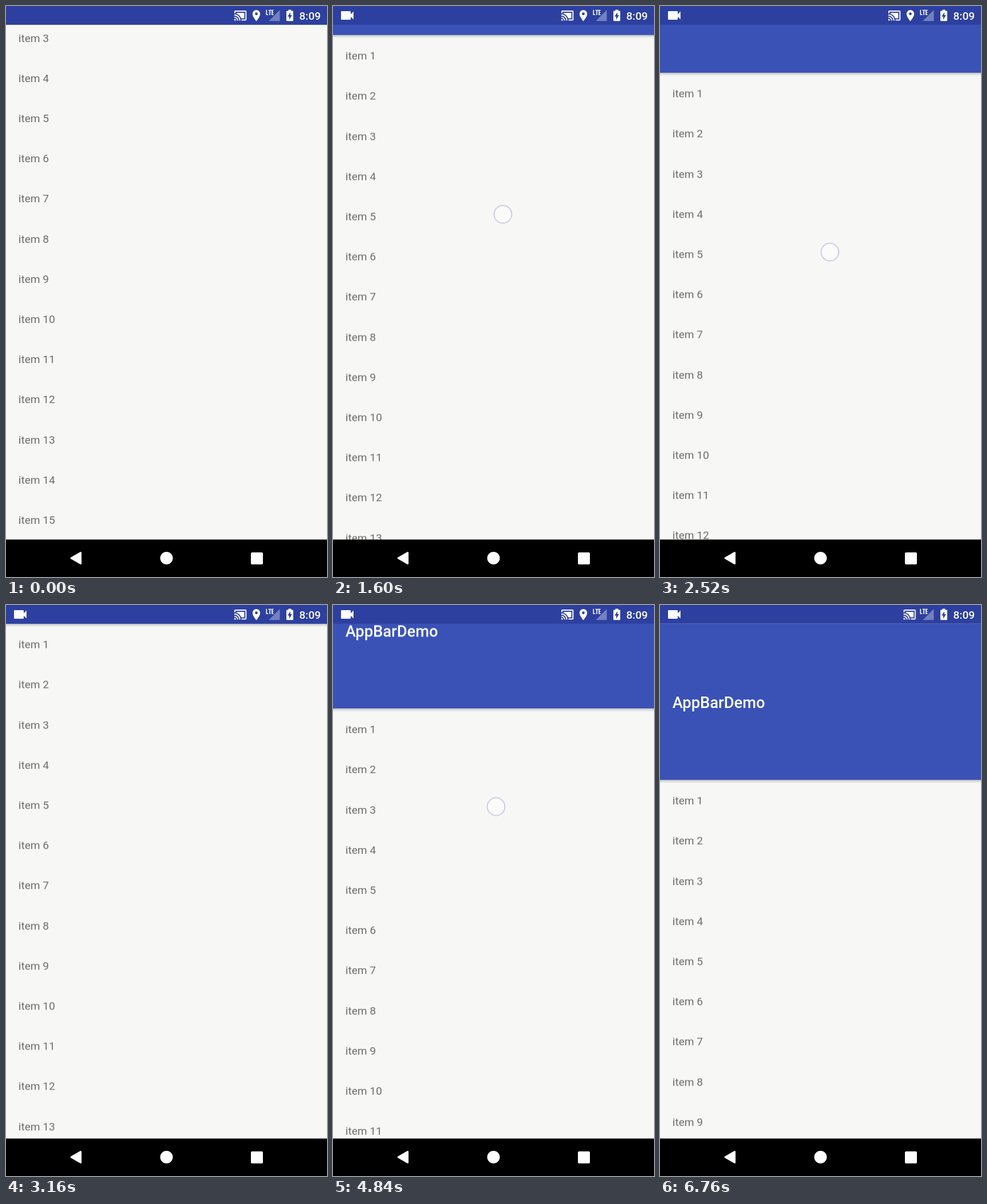
These frames come from a looping animation (561x998 px, 7680 ms). An HTML page:

```html
<!DOCTYPE html>
<html lang="en">
<head>
<meta charset="utf-8">
<title>AppBarDemo</title>
<style>
  html, body { margin: 0; width: 100%; height: 100%; overflow: hidden; background: #000; }
  svg { display: block; width: 100vw; height: 100vh; }
  text { font-family: Roboto, sans-serif; font-size: 19.1px; }
  .items text { fill: #6c6c6c; }
  .title { font-size: 27.3px; font-weight: 500; fill: #fff; }
  .clock { font-weight: 500; }

  .head, .items, .finger, .touch, .shadow, .camera, .pin, .cast {
    animation: 7.68s linear infinite;
  }
  .head { animation-name: bar; }
  .items { animation-name: scroll; }
  .finger { animation-name: drag; }
  .touch { animation-name: press; animation-timing-function: step-end; }
  .shadow { animation-name: lift; animation-timing-function: step-end; }
  .camera { animation-name: appear; }
  .pin { animation-name: leave; animation-timing-function: step-end; }
  .cast { animation-name: shift; animation-timing-function: step-end; }

  /* App bar pulled out, snapped shut, pulled further, snapped open */
  @keyframes bar {
    0%, 18.2292% { transform: translateY(0); }
    20.8333% { transform: translateY(18px); }
    32.8125% { transform: translateY(84px); animation-timing-function: cubic-bezier(.33, .4, .67, 1); }
    38.02%, 38.28% { transform: translateY(105px); animation-timing-function: cubic-bezier(.333, .667, .667, 1); }
    41.14% { transform: translateY(0); }
    53.125% { transform: translateY(0); animation-timing-function: cubic-bezier(.33, .25, .67, .72); }
    56.7708% { transform: translateY(62px); animation-timing-function: cubic-bezier(.33, .45, .67, 1); }
    69.27%, 71.4% { transform: translateY(191px); animation-timing-function: cubic-bezier(.333, .667, .667, 1); }
    76.04%, 100% { transform: translateY(273px); }
  }
  @keyframes scroll {
    0% { transform: translateY(-153.4px); }
    8.3333% { transform: translateY(-153.4px); animation-timing-function: cubic-bezier(.3, .1, .6, .8); }
    18.2292%, 100% { transform: translateY(0); }
  }
  @keyframes drag {
    0%, 7.8125% { transform: translate(297px, 182px); }
    8.3333% { transform: translate(297px, 192.6px); animation-timing-function: cubic-bezier(.3, .1, .6, .8); }
    18.2292%, 38.28% { transform: translate(297px, 346px); }
    38.3%, 52.08% { transform: translate(287px, 195px); }
    53.125% { transform: translate(287px, 206px); }
    56.7708% { transform: translate(286px, 206px); }
    69.27%, 100% { transform: translate(284px, 202px); }
  }
  @keyframes press {
    0% { opacity: 0; }
    7.81% { opacity: 1; }
    38.28% { opacity: 0; }
    52.08% { opacity: 1; }
    71.6% { opacity: 0; }
    100% { opacity: 0; }
  }
  @keyframes lift { 0% { opacity: 0; } 18.22%, 100% { opacity: 1; } }
  @keyframes appear { 0%, .4% { opacity: 0; } 2%, 100% { opacity: 1; } }
  @keyframes leave { 0% { opacity: 1; } 88.02%, 100% { opacity: 0; } }
  @keyframes shift {
    0% { transform: translateX(0); }
    88.02%, 100% { transform: translateX(26.6px); }
  }
</style>
</head>
<body>
<svg viewBox="0 0 561 998" preserveAspectRatio="none">
  <defs>
    <linearGradient id="shade" x2="0" y2="1">
      <stop offset="0" stop-color="#000" stop-opacity=".24"/>
      <stop offset=".4" stop-color="#000" stop-opacity=".1"/>
      <stop offset="1" stop-color="#000" stop-opacity="0"/>
    </linearGradient>
  </defs>

  <rect width="561" height="998" fill="#f7f7f5"/>
  <g class="head">
    <g class="items" id="items"></g>
    <rect class="shadow" y="32.7" width="561" height="6" fill="url(#shade)"/>
    <rect y="-240.3" width="561" height="273" fill="#3a52b5"/>
    <text class="title" x="21.8" y="-93.5">AppBarDemo</text>
    <g class="finger">
      <circle class="touch" r="15.4" fill="#fff" fill-opacity=".5" stroke="#cccbe6" stroke-width="2"/>
    </g>
  </g>

  <rect width="561" height="32.7" fill="#2d409f"/>
  <g fill="#fff">
    <path class="camera" d="M15.2 9h14.6q1.2 0 1.2 1.2v4.3l4.8-4.9v14l-4.8-4.9v4.1q0 1.2-1.2 1.2H15.2q-1.2 0-1.2-1.2V10.2q0-1.2 1.2-1.2z"/>
    <g class="cast">
      <path transform="translate(398 5) scale(.97)" d="M1 18v3h3c0-1.66-1.34-3-3-3zm0-4v2c2.76 0 5 2.24 5 5h2c0-3.87-3.13-7-7-7zm18-7H5v1.63c3.96 1.28 7.09 4.41 8.37 8.37H19V7zM1 10v2c4.97 0 9 4.03 9 9h2c0-6.08-4.93-11-11-11zm20-7H3c-1.1 0-2 .9-2 2v3h2V5h18v14h-7v2h7c1.1 0 2-.9 2-2V5c0-1.1-.9-2-2-2z"/>
    </g>
    <path class="pin" fill-rule="evenodd" d="M437.5 7a6.7 6.7 0 0 0-6.7 6.7c0 5.1 6.7 12.8 6.7 12.8s6.7-7.7 6.7-12.8A6.7 6.7 0 0 0 437.5 7zm0 4.3a2.4 2.4 0 1 1 0 4.8a2.4 2.4 0 0 1 0-4.8z"/>
    <path fill-opacity=".34" d="M478.5 7v19.2h-19.2z"/>
    <path fill="none" stroke="#fff" stroke-width="1.6" d="M455.3 6.8v8.2h3.2M458.7 7.5h5M461.2 7.5v8.2M467.6 7.5h-2.6v7.5h2.6M465 11.2h2.3"/>
    <path d="M493.5 6.6h5v2h2.2q1.3 0 1.3 1.3v15.1q0 1.3-1.3 1.3h-9.4q-1.3 0-1.3-1.3V9.9q0-1.3 1.3-1.3h2.2z"/>
    <path fill="#2d409f" d="M497 10.9v5.2h2.8l-4.8 8v-5.5h-2.8z"/>
    <text class="clock" x="512.5" y="24">8:09</text>
  </g>

  <rect y="932.5" width="561" height="65.5" fill="#000"/>
  <g fill="#fff" stroke="#fff" stroke-linejoin="round">
    <path stroke-width="3" d="M114 965l16.5-9.5v19z"/>
    <circle cx="280.5" cy="965" r="11" stroke="none"/>
    <rect x="428" y="955" width="21" height="21" rx="2" stroke="none"/>
  </g>
</svg>
<script>
  const items = document.getElementById('items');
  for (let i = 0; i < 17; i++) {
    const row = document.createElementNS('http://www.w3.org/2000/svg', 'text');
    row.setAttribute('x', 21.8);
    row.setAttribute('y', 75.6 + i * 70.2);
    row.textContent = 'item ' + (i + 1);
    items.append(row);
  }
</script>
</body>
</html>
```
